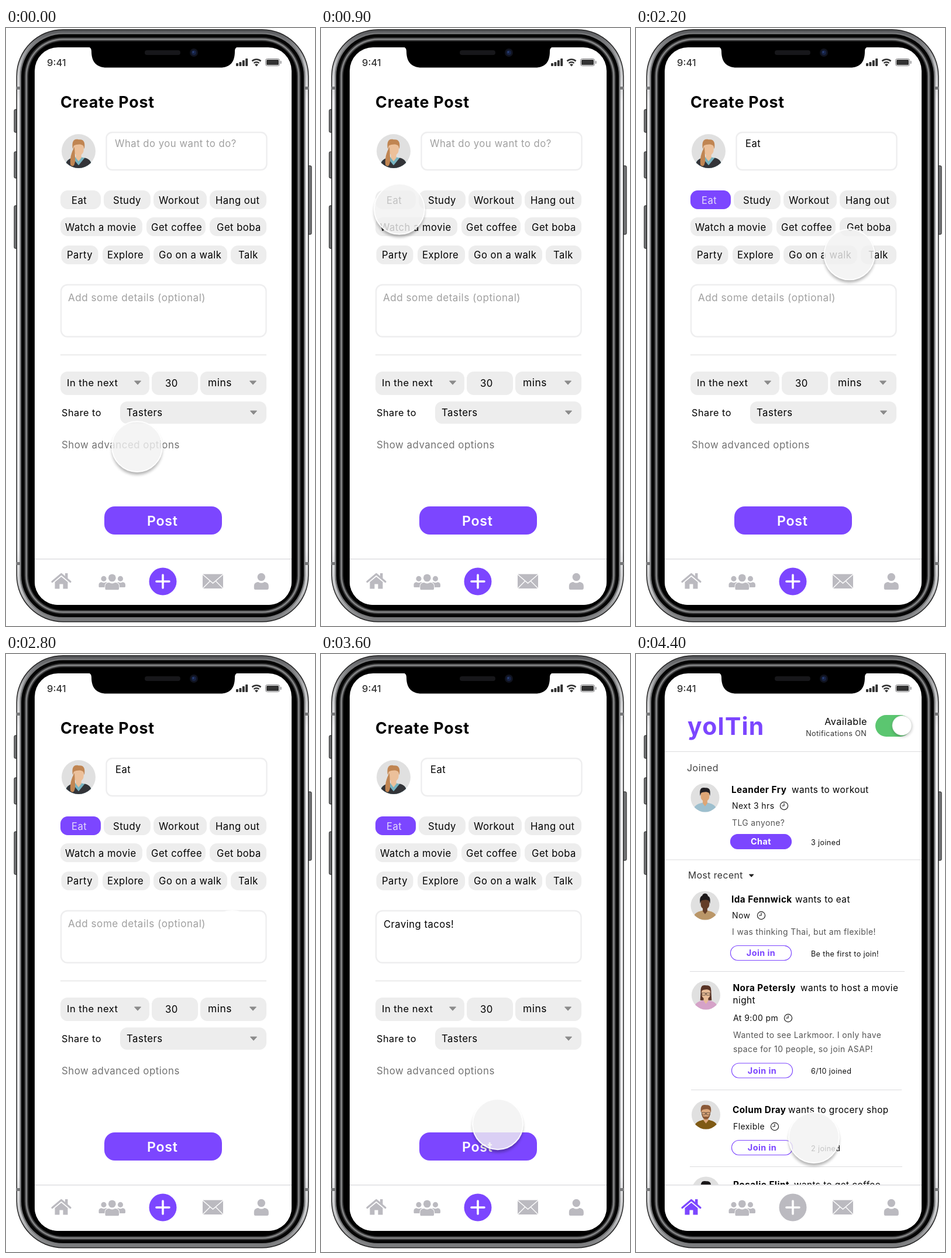
An HTML page that plays this animation: 528x1020 px, repeating every 4500 ms.

```html
<!DOCTYPE html>
<html lang="en">
<head>
<meta charset="utf-8">
<title>Create Post</title>
<style>
html, body { margin: 0; width: 100%; height: 100%; overflow: hidden; background: #fff; }
svg { display: block; width: 100vw; height: 100vh; }
text { font-family: Inter, "Open Sans", sans-serif; letter-spacing: .03em; white-space: pre; }
</style>
</head>
<body>
<svg id="stage" viewBox="0 0 528 1020"></svg>
<script>
const LOOP = 4500;
const PURPLE = '#7c46ff', GREY = '#bbbac0', CHIP = '#ededed';

const rect = (x, y, x2, y2, r, fill, extra = '') =>
  `<rect x="${x}" y="${y}" width="${x2 - x}" height="${y2 - y}" rx="${r}" fill="${fill}" ${extra}/>`;
const circle = (x, y, r, fill, extra = '') =>
  `<circle cx="${x}" cy="${y}" r="${r}" fill="${fill}" ${extra}/>`;
const path = (d, fill, extra = '') => `<path d="${d}" fill="${fill}" ${extra}/>`;
const stroke = (d, color, w, extra = '') =>
  `<path d="${d}" fill="none" stroke="${color}" stroke-width="${w}" ${extra}/>`;
const text = (x, y, str, size, fill = '#000', weight = 400, extra = '') =>
  `<text x="${x}" y="${y}" font-size="${size}" fill="${fill}" font-weight="${weight}" ${extra}>${str}</text>`;
const group = (id, body) => `<g id="${id}">${body}</g>`;
const rule = (x, x2, y, color = '#dcdcde', w = 1.2) => stroke(`M${x} ${y}H${x2}`, color, w);
const arrow = (x, y, w, fill) =>
  path(`M${x} ${y}h${w}l${-w / 2} ${w * .56}z`, fill, `stroke="${fill}" stroke-linejoin="round"`);

// Avatar drawn on a unit of r = 25
function avatar(x, y, r, o) {
  const back = o.long ? path('M-9 -8C-9 -19 9 -19 9 -8L10 9H-10Z', o.hair) : '';
  const braid = o.braid ? path('M-6 -6C-11 2 -13 12 -12 20C-8 25 -5 20 -5 12Z', o.hair) : '';
  const vest = o.vest ? path('M-20 25C-19 14 -14 11 -9 10L0 21L9 10C15 11 19 14 20 25Z', o.vest) : '';
  const beard = o.beard ? path('M-7 -1C-7 11 7 11 7 -1L4 3H-4Z', o.hair) : '';
  const glasses = o.glasses
    ? stroke('M-7 -4h6v4h-6zM1 -4h6v4h-6zM-1 -3h2', '#4a3a30', .8) : '';
  const bun = o.bun ? circle(0, -16, 5, o.hair) : '';
  return `<g transform="translate(${x} ${y}) scale(${r / 25})">` + circle(0, 0, 25, '#e0e0e0') +
    '<g clip-path="url(#face)">' + back + bun +
    path('M-21 27C-21 13 -13 11 -5 9H5C13 11 21 13 21 27Z', o.shirt) + vest +
    path('M-4 2H4V10L0 15L-4 10Z', o.skin) +
    path('M-7.5 -8C-7.5 -16 7.5 -16 7.5 -8V-2C7.5 9 -7.5 9 -7.5 -2Z', o.skin) +
    path('M-8.5 -3C-11 -18 -4 -18 0 -17C8 -18 10 -13 8.5 -3L7 -8C3 -11 -3 -10 -7 -8Z', o.hair) +
    braid + beard + glasses + '</g></g>';
}

function phone() {
  const layers = [
    [0, '#222'], [1.5, 'url(#steel)'], [6, '#77787a'], [8.5, '#050505'],
    [14, '#3b3b3c'], [16, '#858687'], [18.5, '#3a3a3b'], [20.5, '#000']
  ];
  const buttons = [[14, 139, 178], [14, 211, 256], [14, 303, 376], [515, 235, 352]]
    .map(([x, y, y2]) => rect(x, y, x + 7, y2, 2, '#77787a', 'stroke="#1c1c1c"')).join('');
  const bands = [[18, 100], [511, 100], [18, 911], [511, 911]]
    .map(([x, y]) => rect(x, y, x + 6, y + 5, 0, '#77787a')).join('');
  return buttons + layers.map(([d, fill]) =>
    rect(17.5 + d, 2 + d, 517.5 - d, 1013.5 - d, 80 - d, fill)).join('') + bands;
}

function notchAndStatus() {
  const ink = '#333';
  const bars = [5, 7, 10, 13].map((h, i) =>
    rect(393 + i * 5.4, 65 - h, 397 + i * 5.4, 65, 1, ink)).join('');
  return path('M138 32C144 32 146 35 146 40C146 57 154 67.500 172 67.500H366C384 67.500 391 57 391 40C391 35 393 32 399 32Z', '#000') +
    rect(237, 38, 298, 46, 4, '#17171a') + circle(321, 42, 7, '#10131f') +
    circle(321, 42, 4, '#172345') + circle(320, 41, 1.5, '#2c437c') +
    text(70, 64.5, '9:41', 16.5, ink, 500, 'style="letter-spacing:0"') + bars +
    stroke('M420.500 56.500A11 11 0 0 1 435.500 56.500M423.500 60A6.500 6.500 0 0 1 432.500 60', ink, 2.4) +
    path('M425 62.500A4.500 4.500 0 0 1 431 62.500L428 65.500Z', ink) +
    rect(443.5, 52.5, 467.5, 64.5, 3, 'none', `stroke="#77777a"`) +
    rect(445, 54, 466, 63, 1.5, ink) + rect(469, 56, 470.5, 61, .8, '#8a8a8d');
}

function createScreen() {
  const rows = [
    [277, 299.5, [[93, 162, 112, 'Eat'], [167, 247, 183, 'Study'], [252, 343, 261, 'Workout'], [348, 445, 358, 'Hang out']]],
    [323, 345.5, [[93, 233, 101, 'Watch a movie'], [240, 341, 248, 'Get coffee'], [348, 445, 360, 'Get boba']]],
    [371, 393, [[94.5, 157.5, 104, 'Party'], [165, 246, 173, 'Explore'], [252, 378, 261, 'Go on a walk'], [384, 445, 397, 'Talk']]]
  ];
  const chips = rows.map(([y, base, list]) => list.map(([x, x2, tx, label]) =>
    rect(x, y, x2, y + 32, 12.5, CHIP) + text(tx, base, label, 16.6)).join('')).join('');
  const line = 'stroke="#eeeeef" stroke-width="2.4"';
  return text(93, 136, 'Create Post', 26.8, '#000', 700) +
    avatar(124, 210, 29, { skin: '#ecc09a', hair: '#c08552', shirt: '#76b3c1', vest: '#333438', braid: true }) +
    rect(171.5, 178, 445.5, 242, 10, '#fff', line) +
    group('ask', text(186, 203, 'What do you want to do?', 16.7, '#a0a0a0')) +
    group('answer', text(187, 203, 'Eat', 16.6)) + chips +
    group('picked', rect(93, 277, 162, 309, 12.5, PURPLE) + text(112, 299.5, 'Eat', 16.6, '#e4dafa')) +
    rect(94, 438, 444.5, 526.5, 11, '#fff', line) +
    group('hint', text(106, 466, 'Add some details (optional)', 17.1, '#a0a0a0')) +
    group('details', text(107, 467, 'Craving tacos!', 16.6)) +
    rule(93, 445, 557.5, '#ebebec', 2.2) +
    rect(93, 586, 245, 626, 12, CHIP) + rect(249, 586, 328, 626, 12, CHIP) +
    rect(332, 586, 445, 626, 12, CHIP) + rect(195, 637, 445, 675, 12, CHIP) +
    text(104, 611, 'In the next', 16.5) + text(272, 612, '30', 16.8) + text(345, 611, 'mins', 17.4) +
    text(95, 662, 'Share to', 16.3) + text(206, 662, 'Tasters', 16.8) +
    arrow(219.5, 602, 11, '#8c8c8c') + arrow(416.5, 602, 11, '#8c8c8c') + arrow(417.5, 653, 11, '#8c8c8c') +
    text(95, 717, 'Show advanced options', 16.85, '#737373') +
    rect(168, 816, 369, 864, 18, PURPLE) + text(241, 849, 'Post', 23.2, '#fff', 600);
}

const clock = (x, y) => circle(x, y, 6.6, 'none', 'stroke="#222" stroke-width="1.2"') +
  stroke(`M${x} ${y - 4.5}V${y}H${x - 4}`, '#222', 1.2);

const headline = (x, y, name, x2, rest) => text(x, y, name, 15.3, '#000', 700) + text(x2, y, rest, 15.3);

function action(x, y, label, solid, note) {
  return rect(x, y, x + 104, y + 25, 12.5, solid ? PURPLE : '#fff', `stroke="${PURPLE}" stroke-width="1.2"`) +
    text(x + 52, y + 17.8, label, 14.4, solid ? '#fff' : PURPLE, 700, 'text-anchor="middle"') +
    text(299, y + 18, note, 12.6, '#111');
}

function homeScreen() {
  const note = (y, s, x = 164) => text(x, y, s, 13.9, '#555');
  const when = (x, y, s, cx) => text(x, y, s, 14, '#111') + clock(cx, y - 5);
  return text(88, 138, 'yolTin', 41, PURPLE, 700) +
    text(395, 121, 'Available', 16.2, '#000', 400, 'text-anchor="end"') +
    text(394, 140, 'Notifications ON', 12.6, '#333', 400, 'text-anchor="end"') +
    rect(409, 104, 470, 141, 18.5, '#5bc670') +
    circle(455, 124, 17, '#000', 'opacity=".22" filter="url(#soft)"') + circle(454.5, 122, 16.6, '#fff', 'stroke="#d4d8d4" stroke-width=".6"') +
    rule(49, 488, 166.5) + text(87, 200, 'Joined', 16, '#444') +
    avatar(118, 245, 24.5, { skin: '#dda676', hair: '#222024', shirt: '#9dbfce' }) +
    headline(163, 237, 'Leander Fry', 266, 'wants to workout') +
    when(164, 264, 'Next 3 hrs', 253) + note(292.5, 'TLG anyone?') +
    action(161.5, 307.5, 'Chat', true, '3 joined') + rule(49, 488, 351) +
    text(89, 383, 'Most recent', 15.7, '#333') + arrow(193.5, 376, 7.5, '#222') +
    avatar(118, 429, 24.5, { skin: '#633d28', hair: '#1d191a', shirt: '#ba9668', bun: true }) +
    headline(163, 424, 'Ida Fennwick', 272, 'wants to eat') +
    when(164, 451, 'Now', 214) + note(479, 'I was thinking Thai, but am flexible!') +
    action(161.5, 497.5, 'Join in', false, 'Be the first to join!') + rule(92, 459, 541.5) +
    avatar(119.5, 582, 24.5, { skin: '#e9bd98', hair: '#593426', shirt: '#d5a2c8', long: true, glasses: true }) +
    headline(165.5, 575, 'Nora Petersly', 281, 'wants to host a movie') + text(165.5, 596, 'night', 15.3) +
    when(166, 626, 'At 9:00 pm', 260) +
    note(655, 'Wanted to see Larkmoor. I only have', 166) +
    note(678.5, 'space for 10 people, so join ASAP!', 166) +
    action(163.5, 698, 'Join in', false, '6/10 joined') + rule(94, 454, 743.5) +
    avatar(119.5, 786, 24.5, { skin: '#dca77b', hair: '#8a5938', shirt: '#7f5a14', beard: true, glasses: true }) +
    headline(165, 782.5, 'Colum Dray', 260, 'wants to grocery shop') +
    when(166, 811, 'Flexible', 237) +
    action(163.5, 829.5, 'Join in', false, '2 joined') + rule(92, 455, 874.5) +
    avatar(119.5, 916, 24.5, { skin: '#b98258', hair: '#1a1718', shirt: '#888', long: true }) +
    headline(166, 911, 'Rosalie Flint', 270, 'wants to get coffee');
}

function person(x, y, k) {
  return `<g transform="translate(${x} ${y}) scale(${k})">` + circle(0, -7.5, 6.7, GREY) +
    path('M-12.500 14V8C-12.500 3 -9 1 -5 1C-2 3 2 3 5 1C9 1 12.500 3 12.500 8V11C12.500 13 11.500 14 10 14H-10C-12 14 -12.500 13 -12.500 11Z', GREY) + '</g>';
}

function navBar() {
  return rect(49, 905, 488, 984, 0, '#fff') + rule(49, 488, 905.8, '#dedee1', 1.6) +
    group('house', stroke('M79 944.500L94.500 931.500L110 944.500', 'currentColor', 3.2, 'stroke-linecap="round" stroke-linejoin="round"') +
      path('M101 930H105.500V940L101 936ZM83.500 945L94.500 936L105.500 945V956.500H97.500V948.500H91.500V956.500H83.500Z', 'currentColor')) +
    person(167, 944.5, .68) + person(195.500, 944.5, .68) +
    `<g stroke="#fff" stroke-width="2" paint-order="stroke">${person(181.3, 945, .95)}</g>` +
    circle(268, 944, 23.5, 'currentColor', 'id="plus"') +
    stroke('M257 944H279M268 933V955', '#fff', 3.6, 'stroke-linecap="round"') +
    rect(336, 931.5, 371, 956, 1, GREY) +
    stroke('M336 932L353.500 947L371 932M336 956L348.500 943.500M371 956L358.500 943.500', '#fff', 1.4) +
    person(436.3, 944, 1);
}

const touch = `<g id="touch">
  <g mask="url(#outside)"><circle id="shade" cy="5" r="43" filter="url(#soft)"/></g>
  <circle id="disc" r="43" stroke="#fff" stroke-width="2" stroke-opacity=".9"/></g>`;

document.getElementById('stage').innerHTML = `<defs>
  <linearGradient id="steel" x1="0" y1="0" x2="0" y2="1">
    <stop offset="0" stop-color="#56575a"/><stop offset=".06" stop-color="#c2c3c5"/>
    <stop offset=".12" stop-color="#eeeef0"/><stop offset=".88" stop-color="#eeeef0"/>
    <stop offset=".95" stop-color="#c2c3c5"/><stop offset="1" stop-color="#77787a"/>
  </linearGradient>
  <filter id="soft" x="-30%" y="-30%" width="160%" height="160%"><feGaussianBlur stdDeviation="2.6"/></filter>
  <clipPath id="face"><circle r="25"/></clipPath>
  <clipPath id="screen"><rect x="49" y="33" width="439" height="951" rx="40"/></clipPath>
  <mask id="outside" maskUnits="userSpaceOnUse" x="-70" y="-70" width="140" height="140">
    <rect x="-70" y="-70" width="140" height="140" fill="#fff"/><circle r="43.500" fill="#000"/></mask>
  </defs>` + phone() +
  `<g clip-path="url(#screen)">` + rect(49, 33, 488, 984, 0, '#fff') +
  group('create', createScreen()) + group('home', homeScreen()) + navBar() + '</g>' +
  notchAndStatus() + touch;

// Time, x, y of the touch point
const track = [
  [0, 224, 714], [900, 134, 309], [1200, 125, 283], [1800, 125, 283], [2200, 364.5, 386],
  [2400, 380, 455], [2550, 386.5, 481], [3100, 386.5, 481], [3600, 302, 802], [3850, 304, 825], [LOOP, 304, 825]
];
// Start and end of pressing in, then of letting go
const presses = [[1220, 1380, 1800, 1950], [2580, 2740, 3000, 3150], [3880, 4020, 4220, 4320]];

const clamp = v => Math.max(0, Math.min(1, v));
const ramp = (t, a, b) => clamp((t - a) / (b - a));
const slope = (i, k) => (track[i + 1][k] - track[i][k]) / (track[i + 1][0] - track[i][0]);

function tangent(i, k) {
  if (i === 0 || i === track.length - 1) return 0;
  const a = slope(i - 1, k), b = slope(i, k);
  return a * b > 0 ? 2 * a * b / (a + b) : 0;
}

// Monotone cubic through the track
function along(t, k) {
  let i = 0;
  while (i < track.length - 2 && t >= track[i + 1][0]) i++;
  const span = track[i + 1][0] - track[i][0], u = (t - track[i][0]) / span, v = 1 - u;
  return track[i][k] * (1 + 2 * u) * v * v + track[i + 1][k] * u * u * (3 - 2 * u) +
    span * u * v * (tangent(i, k) * v - tangent(i + 1, k) * u);
}

const el = id => document.getElementById(id);
const show = (id, on) => el(id).setAttribute('visibility', on ? 'visible' : 'hidden');

function draw(t) {
  const eat = t >= 1700, typed = t >= 2950, home = t >= 4300;
  el('create').setAttribute('display', home ? 'none' : 'inline');
  el('home').setAttribute('display', home ? 'inline' : 'none');
  show('ask', !eat);
  show('answer', eat);
  show('picked', eat);
  show('hint', !typed);
  show('details', typed);
  el('house').style.color = home ? PURPLE : GREY;
  el('plus').style.color = home ? GREY : PURPLE;

  const p = Math.max(...presses.map(([a, b, c, d]) => ramp(t, a, b) - ramp(t, c, d)));
  const tone = Math.round(242 + 13 * p);
  el('touch').setAttribute('transform', `translate(${along(t, 1)} ${along(t, 2)})`);
  el('disc').setAttribute('fill', `rgb(${tone},${tone},${tone})`);
  el('disc').setAttribute('fill-opacity', .8 - .3 * p);
  el('shade').setAttribute('opacity', .3 * (1 - p));
}

const start = performance.now();
function tick() {
  draw((performance.now() - start) % LOOP);
  requestAnimationFrame(tick);
}
tick();
</script>
</body>
</html>
```
